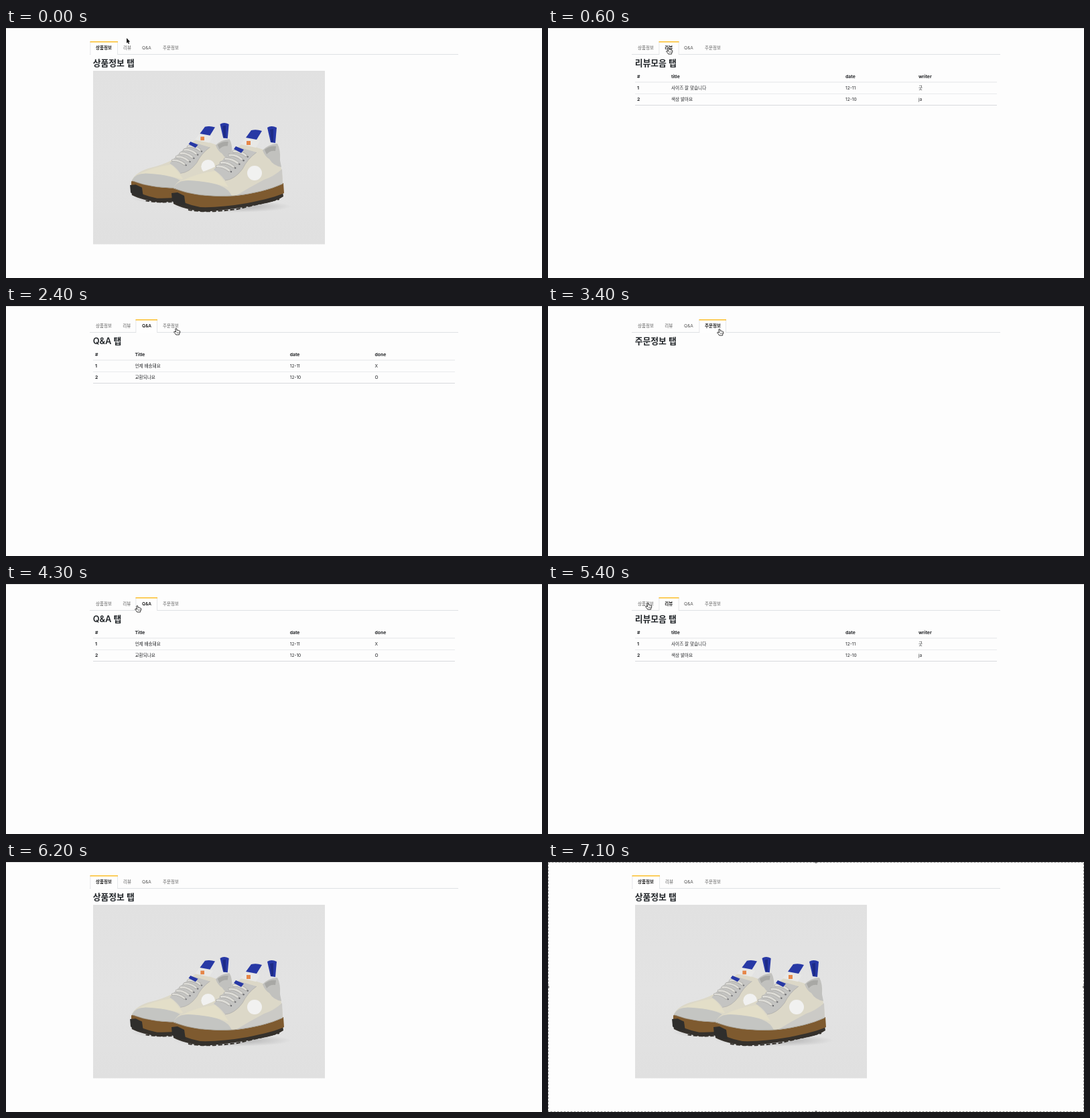
Write an HTML page with a canvas that moves like this. It is 800 by 374 pixels and loops after 7200 ms.

```html
<!DOCTYPE html>
<html lang="ko">
<head>
<meta charset="utf-8">
<title>Tabs</title>
<style>
html, body { margin: 0; width: 100%; height: 100%; overflow: hidden; background: #fdfdfd; }
canvas { display: block; width: 800px; height: 374px; }
</style>
</head>
<body>
<canvas id="stage"></canvas>
<script>
const W = 800, H = 374, LOOP = 7200, STEP = 100;
const FONT = 'Inter, "Noto Sans CJK KR", "Noto Sans CJK", sans-serif';
const canvas = document.getElementById('stage');
const ctx = canvas.getContext('2d');
const dpr = window.devicePixelRatio || 1;
canvas.width = W * dpr;
canvas.height = H * dpr;

const tabs = [
  { label: '상품정보', x: 134, left: 125.5, right: 167 },
  { label: '리뷰', x: 174.3, left: 165.5, right: 195.5 },
  { label: 'Q&A', x: 203, left: 193.5, right: 226 },
  { label: '주문정보', x: 234, left: 225.5, right: 266 }
];

const pages = [
  { title: '상품정보 탭' },
  {
    title: '리뷰모음 탭', cols: [133, 184, 444, 553],
    rows: [['#', 'title', 'date', 'writer'],
           ['1', '사이즈 잘 맞습니다', '12-11', '굿'],
           ['2', '색상 밝아요', '12-10', 'ja']]
  },
  {
    title: 'Q&A 탭', cols: [133, 192.5, 423.7, 550.5],
    rows: [['#', 'Title', 'date', 'done'],
           ['1', '언제 배송돼요', '12-11', 'X'],
           ['2', '교환되나요', '12-10', 'O']]
  },
  { title: '주문정보 탭' }
];

// [start time, tab index]
const clicks = [[0, 0], [600, 1], [1800, 2], [2800, 3], [4000, 2], [4600, 1], [5500, 0]];

// pointer tip: [time, x, y]
const path = [
  [0, 180, 15], [200, 180, 29], [1000, 180, 29], [1250, 160, 31], [1700, 207, 31],
  [2000, 207, 32], [2400, 254, 33], [2600, 256, 34], [3400, 256, 34], [3900, 207, 32],
  [4200, 201, 32], [4300, 196, 32], [4550, 181, 30], [4950, 180, 30], [5300, 150, 28],
  [5400, 149, 28], [5500, 150, 29], [5750, 150, 29], [6200, 190, -14]
];

function fill(d, color) {
  ctx.fillStyle = color;
  ctx.fill(new Path2D(d));
}

function line(d, color, width) {
  ctx.strokeStyle = color;
  ctx.lineWidth = width;
  ctx.stroke(new Path2D(d));
}

function rect(x, y, w, h, color) {
  ctx.fillStyle = color;
  ctx.fillRect(x, y, w, h);
}

function dot(x, y, r, color) {
  ctx.fillStyle = color;
  ctx.beginPath();
  ctx.arc(x, y, r, 0, Math.PI * 2);
  ctx.fill();
}

function text(s, x, y, size, weight, color) {
  ctx.font = `${weight} ${size}px ${FONT}`;
  ctx.fillStyle = color;
  ctx.fillText(s, x, y);
}

function shadow(x, y, rx, ry, alpha) {
  ctx.save();
  ctx.translate(x, y);
  ctx.scale(rx, ry);
  const g = ctx.createRadialGradient(0, 0, 0.4, 0, 0, 1);
  g.addColorStop(0, `rgba(90,90,92,${alpha})`);
  g.addColorStop(1, 'rgba(90,90,92,0)');
  dot(0, 0, 1, g);
  ctx.restore();
}

function drawShoe() {
  // sole and tread
  fill('M248 248 Q270 256 300 262 Q360 260 413 245 L414 252 Q404 259 388 262 Q345 271 295 275 Q265 271 250 263 Z', '#35312c');
  ctx.setLineDash([6, 3]);
  line('M272 272 Q300 277 345 271 L408 256', '#35312c', 2);
  ctx.setLineDash([]);
  fill('M249 241 Q256 238 264 243 Q290 252 340 249 Q385 243 414 232 L415 247 Q400 254 360 262 Q320 269 290 268 Q266 264 249 251 Z', '#7e5a2f');
  fill('M247 247 L256 246 L266 251 L268 265 L258 265 L248 259 Z', '#2f2e2c');

  // upper panels
  fill('M250 239 Q257 225 280 219 Q300 214 315 206 Q332 192 345 179 L354 172 L384 182 Q391 175 404 173 Q409 180 408 198 Q413 215 413 233 Q385 246 340 251 Q285 254 250 239 Z', '#dcd8c8');
  fill('M262 229 Q285 217 312 214 Q322 222 332 238 Q300 228 262 229 Z', '#e3dec8');
  fill('M250 239 Q256 228 272 228 Q308 230 322 237 Q332 241 337 251 Q285 254 250 239 Z', '#c4c5c2');
  fill('M385 227 Q400 222 412 211 L413 233 Q385 246 343 251 Q364 238 385 227 Z', '#cbcac6');
  fill('M310 212 Q336 182 350 179 L374 186 Q360 196 353 211 Q341 227 327 228 Q320 218 310 212 Z', '#c4c4c2');
  fill('M383 183 Q391 174 405 173 Q410 182 409 198 L411 208 Q399 206 393 196 Q387 193 383 183 Z', '#c1c1be');
  fill('M386 182 Q393 176 403 177 L402 184 Q394 183 389 189 Z', '#a8a8a5');
  line('M250 240 Q285 254 340 251 Q385 246 413 233', '#a5a29b', 0.8);
  line('M327 228 Q341 227 353 211 Q360 196 374 186', '#acaba7', 0.7);
  dot(371, 217, 11, '#f1f1f0');

  // laces and eyelets
  ctx.lineCap = 'round';
  for (let i = 0; i < 5; i++) {
    const x = 315 + i * 6.2, y = 207 - i * 5.6;
    const lace = `M${x} ${y} q9 -1 18 6`;
    line(lace, '#a3a29e', 4.2);
    line(lace, '#dddcd7', 3);
    dot(x + 21, y + 8, 1.2, '#6d6d70');
  }
  ctx.lineCap = 'butt';

  // tongue label and pull tabs
  fill('M358 164 L366 153 Q374 151 382 154 L374 167 Z', '#2738a5');
  fill('M390 149 Q396 145 404 149 L402 172 L395 171 Z', '#2738a5');
  fill('M394 152 L399 151 L399 170 L396 171 Z', '#1d2b86');
  fill('M350 174 L357 165 L379 169 L373 179 Z', '#e8e8e6');
  rect(359, 169, 6, 6, '#e58648');
  fill('M340 181 L343 177 L355 182 L351 187 Z', '#2738a5');
}

function drawPhoto() {
  const g = ctx.createLinearGradient(0, 64, 0, 324);
  g.addColorStop(0, '#e1e1e1');
  g.addColorStop(0.5, '#e3e3e3');
  g.addColorStop(1, '#e0e0e0');
  rect(130, 64, 346, 259.5, g);
  shadow(256, 255, 70, 8, 0.2);
  shadow(338, 267, 88, 9, 0.24);
  ctx.save();
  ctx.transform(0.94, 0, 0, 0.93, -47.1, 5.4);
  drawShoe();
  ctx.restore();
  drawShoe();
}

function drawTabs(active) {
  rect(125, 39, 550, 1, '#dfe1e4');
  tabs.forEach((tab, i) => {
    const on = i === active;
    if (on) {
      const w = tab.right - tab.left;
      rect(tab.left, 20, w, 20, '#dfe1e4');
      rect(tab.left + 0.8, 20, w - 1.6, 20, '#fefefe');
      rect(tab.left, 20, w, 1.4, '#fbb91c');
    }
    const shift = i === 1 && active === 0 ? 0.7 : 0;
    text(tab.label, tab.x + shift, 30.3, 6.5, on ? 600 : 400, on ? '#1c1c1c' : '#5a5a5a');
  });
}

function drawTable(page) {
  page.rows.forEach((row, r) => {
    const y = 72.7 + r * 17.2;
    row.forEach((cell, c) => {
      const bold = r === 0 || c === 0;
      text(cell, page.cols[c], y, bold ? 6.8 : 6.6, bold ? 700 : 400, '#242629');
    });
  });
  rect(130, 80.5, 540, 1, '#e4e6e8');
  rect(130, 98, 540, 1, '#e9eaec');
  rect(130, 115, 540, 1, '#d8dadd');
}

function drawPointer(x, y, hand) {
  ctx.save();
  ctx.translate(x, y);
  ctx.lineJoin = 'round';
  if (hand) {
    const d = 'M-1.2 1 Q-.3 -.3 .7 .9 L1.3 3.4 Q2.3 2.8 3 3.7 Q4 3.2 4.6 4.2 Q5.8 4 5.8 5.3 Q5.9 7.3 4.7 8.4 L4.6 10 L-.4 10 Q-1.2 8.2 -3.3 6.2 Q-3.4 4.8 -2 5.1 L-.4 6 Z';
    fill(d, '#fff');
    line(d, '#1c1c1c', 0.9);
    line('M1.3 5.8 V8 M2.8 5.8 V8 M4.2 5.8 V8', '#1c1c1c', 0.5);
  } else {
    ctx.scale(0.9, 0.9);
    const d = 'M0 0 L0 8.6 L1.9 6.9 L3.2 9.9 L4.6 9.3 L3.3 6.3 L5.7 6.2 Z';
    line(d, '#fff', 1);
    fill(d, '#111');
  }
  ctx.restore();
}

function pointerAt(t) {
  const next = path.findIndex(k => k[0] > t);
  if (next < 0) return null;
  const [t0, x0, y0] = path[next - 1], [t1, x1, y1] = path[next];
  const u = (t - t0) / (t1 - t0), e = u * u * (3 - 2 * u);
  return [x0 + (x1 - x0) * e, y0 + (y1 - y0) * e];
}

function drawSelection() {
  ctx.strokeStyle = '#8c8c8c';
  ctx.lineWidth = 1;
  ctx.setLineDash([3, 2]);
  ctx.strokeRect(0.5, 0.5, W - 1, H - 1);
  ctx.setLineDash([]);
  for (const [x, y] of [[0, H / 2], [W, H / 2], [W / 2, 0], [W / 2, H]]) dot(x, y, 2, '#777');
}

function draw(t) {
  ctx.setTransform(dpr, 0, 0, dpr, 0, 0);
  ctx.textBaseline = 'middle';
  rect(0, 0, W, H, '#fdfdfd');
  rect(0, 0, W, 1, '#dcdcdc');

  const active = clicks.filter(c => c[0] <= t).pop()[1];
  const page = pages[active];
  drawTabs(active);
  text(page.title, 129.7, 52.8, 12.8, 600, '#212529');
  if (active === 0) drawPhoto();
  if (page.rows) drawTable(page);

  const p = pointerAt(t);
  if (p) drawPointer(p[0], p[1], p[1] > 21);
  if (t >= 6400) drawSelection();
}

function tick(now) {
  draw(Math.floor((now % LOOP) / STEP) * STEP);
  requestAnimationFrame(tick);
}
requestAnimationFrame(tick);
</script>
</body>
</html>
```
